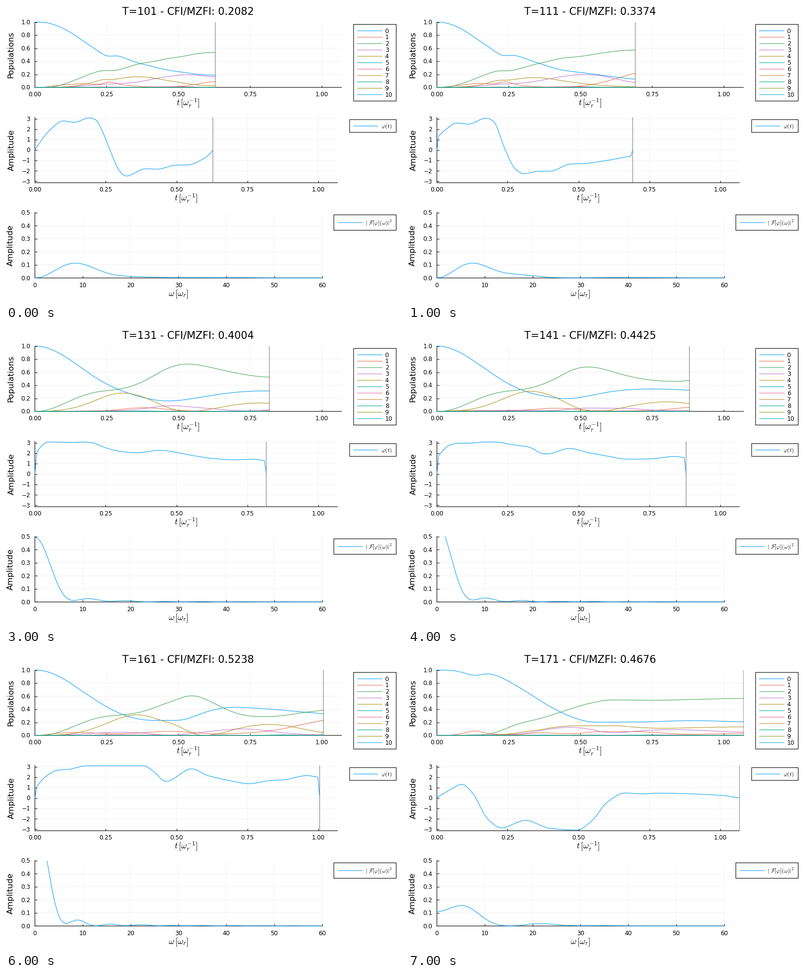
A matplotlib script for the animation above (8 s loop, 800 px wide and 600 px high).

```python
import numpy as np
import matplotlib.pyplot as plt
from matplotlib.animation import FuncAnimation
from matplotlib.patches import Rectangle

plt.rcParams["font.family"] = "DejaVu Sans"
plt.rcParams["mathtext.fontset"] = "cm"
plt.rcParams["path.snap"] = False

W, H, DPI = 800, 600, 100
PX = 72 / DPI                      # one pixel in points
DT = 2 * np.pi / 1000              # time step of the pulse
DEPTH = 10                         # lattice depth in recoil energies
STEPS = range(101, 172, 10)
BLENDS = {121: (111, 131, .85), 141: (131, 151, .5)}
COLORS = ["#009AFA", "#E36F47", "#3EA44E", "#C371D2", "#AC8E18", "#00AAAE",
          "#ED5E93", "#C68225", "#00A98D", "#8E971E", "#00A9CC"]
OMEGA = np.linspace(0, 60, 2401)

scores, keys = {}, {}


def pulse(steps, score, *points):
    scores[steps] = score
    keys[steps] = np.array(points, float).T


# Turning points (time, phase) of each optimised pulse
pulse(101, .2082, (0, .05), (.05, 1.85), (.1, 2.8), (.137, 2.67),
      (.195, 3.1), (.215, 2.9), (.24, 1.7), (.265, 0), (.3, -2.05),
      (.323, -2.5), (.39, -1.8), (.43, -1.84), (.5, -1.45), (.54, -1.43),
      (.6, -.75), (.628, -.1))
pulse(111, .3374, (0, 1.2), (.03, 1.95), (.07, 2.6), (.11, 2.5),
      (.175, 3.07), (.2, 2.75), (.24, .1), (.275, -1.75), (.305, -2.27),
      (.365, -2.03), (.4, -2.03), (.47, -1.35), (.52, -1.29), (.6, -1),
      (.691, -.55))
pulse(131, .4004, (0, 1.8), (.02, 2.6), (.045, 3.09), (.13, 3.05),
      (.17, 3.08), (.2, 3.02), (.25, 2.52), (.3, 2.18), (.36, 2.05),
      (.44, 2.28), (.55, 1.82), (.62, 1.52), (.705, 1.37), (.77, 1.43),
      (.817, 1.26))
pulse(151, .4846, (0, 1.3), (.04, 2.35), (.08, 2.84), (.12, 2.88),
      (.18, 3.1), (.335, 3.1), (.355, 2.9), (.395, 1.93), (.415, 1.8),
      (.5, 2.65), (.575, 2), (.64, 1.71), (.705, 1.37), (.82, 1.6),
      (.905, 1.97), (.942, 1.85))
pulse(161, .5238, (0, .9), (.035, 2), (.08, 2.68), (.12, 2.76), (.18, 3.1),
      (.385, 3.1), (.415, 2.65), (.463, 1.6), (.553, 2.81), (.61, 2.17),
      (.69, 1.67), (.755, 1.38), (.83, 1.68), (.88, 1.76), (.96, 2.16),
      (1.005, 1.98))
pulse(171, .4676, (0, .05), (.05, .85), (.088, 1.32), (.125, .5),
      (.18, -2.02), (.227, -2.86), (.312, -2.15), (.4, -2.92),
      (.495, -3.08), (.55, -2.1), (.6, -.43), (.665, .49), (.72, .4),
      (.78, .47), (1, .27), (1.068, 0))
for mid, (a, b, w) in BLENDS.items():
    scores[mid] = (scores[a] + scores[b]) / 2


def monotone(x, xs, ys):
    """Cubic curve through the keys that turns only at the keys."""
    d = np.diff(ys) / np.diff(xs)
    same = d[:-1] * d[1:] > 0
    total = np.where(same, d[:-1] + d[1:], 1)
    inner = np.where(same, 2 * d[:-1] * d[1:] / total, 0)
    m = np.concatenate([d[:1], inner, d[-1:]])
    i = np.clip(np.searchsorted(xs, x) - 1, 0, len(d) - 1)
    h = xs[i + 1] - xs[i]
    u = np.clip((x - xs[i]) / h, 0, 1)
    rise = u * u * (3 - 2 * u)
    return (ys[i] * (1 - rise) + ys[i + 1] * rise
            + h * u * (1 - u) * (m[i] * (1 - u) - m[i + 1] * u))


def phase_of(steps, s):
    """Lattice phase at the fractions s of the pulse."""
    if steps in BLENDS:
        a, b, w = BLENDS[steps]
        return (1 - w) * phase_of(a, s) + w * phase_of(b, s)
    phase = monotone(s * (steps - 1) * DT, *keys[steps])
    phase[[0, -1]] = 0
    return phase


# Momentum states of the lattice, its Bloch bands and one time step at rest
ORDERS = np.arange(-5, 6)
coupling = np.full(len(ORDERS) - 1, -DEPTH / 4)
ENERGY, BANDS = np.linalg.eigh(np.diag(4.0 * ORDERS ** 2)
                               + np.diag(coupling, 1) + np.diag(coupling, -1))
STEP = BANDS * np.exp(-1j * ENERGY * DT) @ BANDS.T


def populations(phase):
    """Band populations while the lattice is shaken by the phase."""
    psi = BANDS[:, 0].astype(complex)
    rows = [psi]
    for shift in np.exp(1j * np.outer(phase[1:], ORDERS)):
        psi = shift * (STEP @ (shift.conj() * psi))
        rows.append(psi)
    return np.abs(np.array(rows) @ BANDS) ** 2


def power(t, phase):
    wave = np.exp(-1j * np.outer(OMEGA, t)) @ phase * DT
    return np.abs(wave) ** 2 / (2 * np.pi)


fig = plt.figure(figsize=(W / DPI, H / DPI), dpi=DPI, facecolor="white")
page = fig.add_axes([0, 0, 1, 1], zorder=-1)
page.set(xlim=(0, W), ylim=(H, 0))
page.axis("off")


def label(x, y, text, size, ha="center", **kw):
    return page.text(x, y, text, fontsize=size * PX, ha=ha, va="baseline", **kw)


def panel(box, xmax, ylim, xticks, yticks, xfmt, yfmt):
    left, top, right, bottom = box
    ax = fig.add_axes([left / W, 1 - bottom / H, (right - left) / W,
                       (bottom - top) / H], facecolor="none")
    ax.set(xlim=(0, xmax), ylim=ylim, xticks=xticks, yticks=yticks)
    ax.set_axisbelow(True)
    ax.grid(color="black", alpha=.1, lw=.55 * PX)
    ax.tick_params(direction="in", length=4.5 * PX, width=PX,
                   labelbottom=False, labelleft=False)
    for side, spine in ax.spines.items():
        spine.set(visible=side in ("left", "bottom"), linewidth=1.1 * PX,
                  zorder=1.5)
    for v in xticks:
        label(left + v / xmax * (right - left), bottom + 18.2, xfmt % v, 12)
    for v in yticks:
        y = bottom - (v - ylim[0]) / (ylim[1] - ylim[0]) * (bottom - top)
        label(49.2, y + 4.4, (yfmt % v).replace("-", "\u2212"), 12, ha="right")
    return ax


def ylabel(x, y, text):
    label(x, y, text, 16.35, rotation=90, rotation_mode="anchor")


def legend(box, x0, x1, names, text_x, size, drop):
    left, top, right, bottom = box
    page.add_patch(Rectangle((left, top), right - left, bottom - top,
                             fc="white", ec="black", lw=1.1 * PX))
    gap = (bottom - top) / (len(names) + 1)
    for n, name in enumerate(names):
        y = top + gap * (n + 1)
        page.plot([x0, x1], [y, y], color=COLORS[n], lw=1.05 * PX)
        label(text_x, y + drop, name, size, ha="left")


def curve(ax, color):
    return ax.plot([], [], color=color, lw=1.05 * PX, clip_on=False)[0]


quarters = [0, .25, .5, .75, 1]
t_max = 170 * DT
pop_ax = panel((58.4, 32.6, 677.8, 165), t_max, (0, 1), quarters,
               [0, .2, .4, .6, .8, 1], "%.2f", "%.1f")
phase_ax = panel((58.4, 225.8, 669.6, 358.2), t_max, (-np.pi, np.pi), quarters,
                 range(-3, 4), "%.2f", "%d")
power_ax = panel((58.4, 418.7, 638.5, 551.3), 60, (0, .5), range(0, 61, 10),
                 [0, .1, .2, .3, .4, .5], "%d", "%.1f")

ylabel(14, 99, "Populations")
ylabel(15.5, 292, "Amplitude")
ylabel(14, 485, "Amplitude")
label(367.7, 201.8, r"$t\,[\omega_r^{-1}]$", 17.5)
label(363.6, 394.9, r"$t\,[\omega_r^{-1}]$", 17.5)
label(348.5, 588.2, r"$\omega\,[\omega_r]$", 17.5)

legend((702.2, 37.3, 788.3, 192.6), 710, 760,
       [str(n) for n in range(len(COLORS))], 765.7, 12, 4.3)
legend((694.2, 230.3, 788.3, 256.2), 702, 751, [r"$\varphi(t)$"],
       757.7, 11.8, 3.2)
legend((662.3, 423.3, 788.3, 454.6), 671, 720,
       [r"$|\,\,\mathcal{F}[\varphi](\omega)|^2$"], 726.5, 11.5, 4.4)

title = label(368.3, 17.3, "", 20.8)
pop_lines = [curve(pop_ax, c) for c in COLORS]
phase_line = curve(phase_ax, COLORS[0])
power_line = curve(power_ax, COLORS[0])
ends = [ax.axvline(0, color="#808080", lw=1.15 * PX, zorder=3)
        for ax in (pop_ax, phase_ax)]


def draw(frame):
    steps = STEPS[frame]
    s = np.linspace(0, 1, steps)
    t = s * (steps - 1) * DT
    phase = phase_of(steps, s)
    title.set_text(f"T={steps} - CFI/MZFI: {scores[steps]:.4f}")
    for line, p in zip(pop_lines, populations(phase).T):
        line.set_data(t, p)
    phase_line.set_data(t, phase)
    spectrum = power(t, phase)
    power_line.set_data(OMEGA, np.where(spectrum > .5, np.nan, spectrum))
    for end in ends:
        end.set_xdata([t[-1], t[-1]])
    return [title, *pop_lines, phase_line, power_line, *ends]


anim = FuncAnimation(fig, draw, frames=len(STEPS), interval=1000,
                     repeat=True, repeat_delay=0)
plt.show()
```
